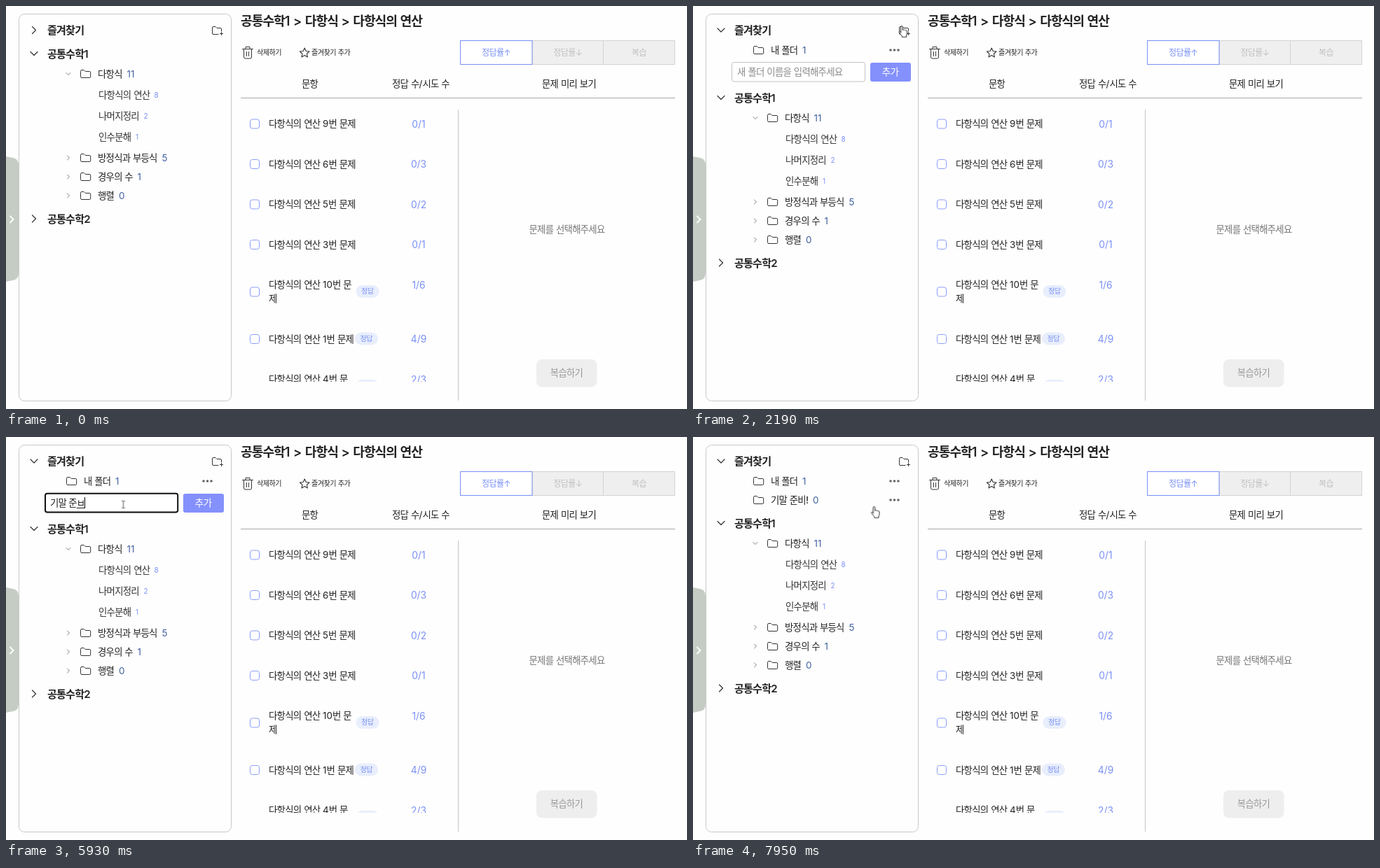
Write an HTML page that moves like this. It is 972 by 576 pixels and loops after 8 s.

```html
<!DOCTYPE html>
<html lang="ko">
<head>
<meta charset="utf-8">
<title>문제 폴더</title>
<style>
html, body { margin: 0; width: 100%; height: 100%; overflow: hidden; background: #fefefe; }
body { position: relative; font-family: Inter, "Noto Sans CJK KR", "Noto Sans CJK", sans-serif; }
svg { position: absolute; left: 0; top: 0; width: 972px; height: 576px; }
text { white-space: pre; }
.k { letter-spacing: -.055em; }
.line { fill: none; stroke: #333; stroke-linecap: round; stroke-linejoin: round; }
.anim, .anim::before { animation: 8s step-end infinite; }

/* sidebar */
#tree { animation-name: tree; }
@keyframes tree {
  0% { transform: translateY(0); }
  24.75% { transform: translateY(63px); }
  95.25%, 100% { transform: translateY(55px); }
}
#closed { animation-name: closed; }
@keyframes closed { 0% { opacity: 1; } 24.75%, 100% { opacity: 0; } }
#opened { animation-name: opened; }
@keyframes opened { 0% { opacity: 0; } 24.75%, 100% { opacity: 1; } }
#form, #field { animation-name: form; }
@keyframes form { 0% { opacity: 0; } 24.75% { opacity: 1; } 95.25%, 100% { opacity: 0; } }
#added { animation-name: added; }
@keyframes added { 0% { opacity: 0; } 95.25%, 100% { opacity: 1; } }
#focus { animation-name: focus; }
@keyframes focus { 0% { opacity: 0; } 44.125% { opacity: 1; } 93.5%, 100% { opacity: 0; } }
#hint { animation-name: hint; }
@keyframes hint {
  0% { opacity: 1; }
  53.25% { opacity: 0; }
  58.25% { opacity: 1; }
  60.75%, 100% { opacity: 0; }
}

/* typing */
#field {
  position: absolute; left: 63px; top: 80px; height: 28px;
  font-size: 13.4px; line-height: 28px; letter-spacing: -.055em;
  white-space: pre; color: #222;
}
#field i { font-style: normal; }
#done::before { content: ""; animation-name: done; }
@keyframes done {
  0% { content: ""; }
  64.125% { content: "기"; }
  67.5% { content: "기말 "; }
  74.125% { content: "기말 준"; }
  78.25%, 100% { content: "기말 준비!"; }
}
#comp { text-decoration: underline 1px; text-underline-offset: 2px; }
#comp::before { content: ""; animation-name: comp; }
@keyframes comp {
  0% { content: ""; }
  53.25% { content: "ㄱ"; }
  58.25% { content: ""; }
  60.75% { content: "ㄱ"; }
  61.625% { content: "기"; }
  63.25% { content: "김"; }
  64.125% { content: "마"; }
  65.75% { content: "말"; }
  67.5% { content: ""; }
  69.25% { content: "ㅈ"; }
  70% { content: "주"; }
  70.875% { content: "준"; }
  74.125% { content: "ㅂ"; }
  74.875% { content: "비"; }
  78.25%, 100% { content: ""; }
}
#caret {
  display: inline-block; width: 1px; height: 16px; margin-right: -1px;
  vertical-align: -3px; background: #000; animation-name: caret;
}
@keyframes caret {
  0% { opacity: 0; }
  44.125% { opacity: 1; }
  50.75% { opacity: 0; }
  53.25% { opacity: 1; }
  84.875% { opacity: 0; }
  91.5% { opacity: 1; }
  93.5%, 100% { opacity: 0; }
}

/* pointer */
#pointer { animation: move 8s linear infinite; }
@keyframes move {
  0%, 4.125% { transform: translate(766px, 520px); animation-timing-function: ease-in-out; }
  13.8%, 14.25% { transform: translate(295.5px, 65.5px); animation-timing-function: ease-out; }
  16.5%, 26.5% { transform: translate(296px, 28.5px); }
  27.375%, 28% { transform: translate(298px, 28.5px); animation-timing-function: ease-in-out; }
  34%, 87.5% { transform: translate(167.5px, 96.5px); animation-timing-function: ease-in-out; }
  92.75%, 98% { transform: translate(263.5px, 93px); }
  99.25%, 100% { transform: translate(258.5px, 99.5px); }
}
#arrow { animation-name: arrow; }
@keyframes arrow {
  0% { opacity: 0; }
  4.125% { opacity: 1; }
  12.25% { opacity: 0; }
  91.25% { opacity: 1; }
  98.5%, 100% { opacity: 0; }
}
#hand { animation-name: hand; }
@keyframes hand {
  0% { opacity: 0; }
  12.25% { opacity: 1; }
  31.8% { opacity: 0; }
  98.5%, 100% { opacity: 1; }
}
#beam { animation-name: beam; }
@keyframes beam { 0% { opacity: 0; } 31.8% { opacity: 1; } 91.25%, 100% { opacity: 0; } }
#click { animation-name: click; }
@keyframes click {
  0% { opacity: 0; fill: #fbf312; }
  22.25% { opacity: .78; }
  24.75% { opacity: 0; }
  44.125% { opacity: .78; fill: #fbf312; }
  46.625% { opacity: 0; }
  93.5% { opacity: .92; fill: #b9b069; }
  96%, 100% { opacity: 0; fill: #b9b069; }
}
</style>
</head>
<body>
<svg id="ui" viewBox="0 0 972 576"></svg>
<div id="field" class="anim"><i id="done" class="anim"></i><i id="comp" class="anim"></i><b id="caret" class="anim"></b></div>
<svg viewBox="0 0 972 576">
  <g id="pointer">
    <circle id="click" class="anim" cx="-.8" r="10"/>
    <path id="arrow" class="anim" d="M0 0V11.5L2.6 9.2 4.4 13 6.1 12.2 4.4 8.6H8z" fill="#fff" stroke="#111" stroke-width=".9"/>
    <g id="hand" class="anim">
      <path transform="translate(-4.5 -.5)" fill="#fff" stroke="#222" stroke-linejoin="round"
        d="M3.2 10.4V1.9a1.3 1.3 0 0 1 2.6 0V6.6a1.2 1.2 0 0 1 2.2-.1 1.2 1.2 0 0 1 2.1.6 1.1 1.1 0 0 1 1.9.8V11q0 2-1 3.3v2.1H4.9V15Q3.6 13.4 1 10.2.2 8.9 1.2 8.3 2 8 3.2 9.6"/>
    </g>
    <path id="beam" class="anim" d="M-2.5-5H-1Q0-5 0-4Q0-5 1-5H2.5M0-4V4M-2.5 5H-1Q0 5 0 4Q0 5 1 5H2.5" fill="none" stroke="#444" stroke-width=".9"/>
  </g>
</svg>
<script>
const INK = '#222', BLUE = '#7a90f6', NAVY = '#41609f';

// y is the visual middle of the line
function label(x, y, s, { size = 13.4, fill = INK, weight = 400, mid = false } = {}) {
  const body = s.replace(/>/g, '&gt;').replace(/[가-힣]+/g, '<tspan class="k">$&</tspan>');
  return `<text x="${x}" y="${y + size * 0.37}" font-size="${size}" fill="${fill}" font-weight="${weight}"` +
    `${mid ? ' text-anchor="middle"' : ''}>${body}</text>`;
}
const rect = (x, y, w, h, r, fill, stroke = 'none', attrs = '') =>
  `<rect x="${x}" y="${y}" width="${w}" height="${h}" rx="${r}" fill="${fill}" stroke="${stroke}" ${attrs}/>`;
const path = (d, attrs = '') => `<path class="line" d="${d}" ${attrs}/>`;
const group = (id, body) => `<g id="${id}" class="anim">${body}</g>`;

const BOLD = 'stroke-width="1.2"', FAINT = 'stroke-width=".9" opacity=".7"';
const right = (x, y, r, pen = BOLD) => path(`M${x - r / 2} ${y - r}l${r} ${r}l${-r} ${r}`, pen);
const down = (x, y, r, pen = BOLD) => path(`M${x - r} ${y - r / 2}l${r} ${r}l${r} ${-r}`, pen);
const folder = (x, y) => path(`M${x + .5} ${y - 4}q0-1.5 1.5-1.5h3.2l2 2h6q1.5 0 1.5 1.5v6q0 1.5-1.5 1.5h-11.2q-1.5 0-1.5-1.5z`);
const head = (y, s) => label(59, y, s, { size: 15.1, weight: 600 });
const dots = y => [282, 287.5, 293].map(x => `<circle cx="${x}" cy="${y}" r="1.8" fill="#666"/>`).join('');

function branch(y, name, nameEnd, count, open) {
  return (open ? down : right)(89, y, 3, FAINT) + folder(106, y) +
    label(131, y, name, { weight: 500 }) + label(nameEnd, y, count, { fill: NAVY });
}
const leaf = (y, name, end, count) =>
  label(132, y, name, { fill: '#333' }) + label(end, y, count, { size: 10, fill: BLUE });
const saved = (y, name, end, count) =>
  folder(86, y) + label(111, y, name, { weight: 500 }) + label(end, y, count, { fill: NAVY }) + dots(y);

function sidebar() {
  const tree = down(40, 68, 5) + head(68, '공통수학1') +
    branch(97, '다항식', 172.5, '11', true) +
    leaf(127, '다항식의 연산', 211.5, '8') +
    leaf(157, '나머지정리', 196.5, '2') +
    leaf(187, '인수분해', 185, '1') +
    branch(217, '방정식과 부등식', 222.5, '5') +
    branch(244, '경우의 수', 187.5, '1') +
    branch(271, '행렬', 161, '0') +
    right(40, 304, 5) + head(304, '공통수학2');
  const form = rect(55.5, 80.5, 190, 27.5, 3, '#fff', '#c2c2c2') +
    group('focus', rect(56, 80.8, 189.2, 26.7, 3, '#fff', '#111', 'stroke-width="2"')) +
    group('hint', label(63, 94, '새 폴더 이름을 입력해주세요', { fill: '#8a8a8a' })) +
    rect(253, 81, 58, 27, 3, '#8490fc') +
    label(281.5, 94, '추가', { size: 13.8, fill: '#fff', weight: 500, mid: true });
  return '<path d="M0 215L10 217Q18 218.5 18 227V382Q18 390.5 10 392L0 394z" fill="#c5ccc4"/>' +
    '<path d="M5.5 300l5 5-5 5" fill="none" stroke="#fff" stroke-width="1.8"/>' +
    rect(18.5, 11.5, 303, 553, 8, '#fefefe', '#c8c8c8') +
    head(34.5, '즐겨찾기') +
    path('M303 40.5H296q-1.5 0-1.5-1.5V31q0-1.5 1.5-1.5h3l2 2h5q1.5 0 1.5 1.5V36M307.5 37.5v4M305.5 39.5h4') +
    group('closed', right(40, 34.5, 5)) +
    group('opened', down(40, 34.5, 5) + saved(63, '내 폴더', 156, '1')) +
    group('form', form) +
    group('added', saved(90, '기말 준비!', 171, '0')) +
    group('tree', tree);
}

function star(cx, cy, R, r) {
  const pts = Array.from({ length: 10 }, (_, i) => {
    const a = Math.PI * (i / 5 - 0.5), d = i % 2 ? r : R;
    return `${(cx + d * Math.cos(a)).toFixed(2)} ${(cy + d * Math.sin(a)).toFixed(2)}`;
  });
  return path(`M${pts.join('L')}z`, 'stroke-width="1.1"');
}

function toolbar() {
  const tab = (x, w, s, on) =>
    rect(x, 49.5, w, 34, 0, on ? '#fff' : '#efefef', on ? BLUE : '#d2d2d2') +
    label(x + w / 2, 66.5, s, { size: 12.1, fill: on ? BLUE : '#c0c0c0', mid: true });
  return label(335, 21, '공통수학1 > 다항식 > 다항식의 연산', { size: 18.15, weight: 600 }) +
    path('M337.5 61.5h15M342 61v-2.5h6V61M339.5 62v11q0 2 2 2h7q2 0 2-2V62M343.5 65.5v6M346.5 65.5v6') +
    label(358, 66.5, '삭제하기', { size: 10.1 }) +
    star(426.2, 67.2, 7.2, 3.4) +
    label(436, 66.5, '즐겨찾기 추가', { size: 10.1 }) +
    tab(751.5, 101, '정답률↓') + tab(852.5, 102, '복습') + tab(648.5, 102.5, '정답률↑', true);
}

function badge(x, y) {
  return rect(x, y, 33, 18, 9, '#e8eefc') +
    label(x + 16.3, y + 8.7, '정답', { size: 10.1, fill: BLUE, mid: true });
}

function problem(y, n, score, { boxY = y, tail = ' 문제', extra = '' } = {}) {
  return rect(348.5, boxY - 6.5, 13, 13, 3, '#fff', '#8b9df8') +
    label(375, y, `다항식의 연산 ${n}번${tail}`) +
    label(589, y, score, { size: 13.8, fill: BLUE, mid: true }) + extra;
}

function list() {
  const mid = (x, y, s, fill = INK) => label(x, y, s, { fill, mid: true });
  const rows = problem(168.5, 9, '0/1') + problem(226, 6, '0/3') +
    problem(283.5, 5, '0/2') + problem(341, 3, '0/1') +
    problem(398.5, 10, '1/6', { boxY: 408.5, tail: ' 문', extra: label(375, 418.5, '제') + badge(499.5, 399) }) +
    problem(476, 1, '4/9', { extra: badge(498, 466.5) }) +
    problem(533.5, 4, '2/3', { boxY: 545, tail: ' 문', extra: badge(499.5, 534) });
  return mid(433.5, 111, '문항') + mid(592, 111, '정답 수/시도 수') + mid(803.5, 111, '문제 미리 보기') +
    rect(335, 131, 620, 1, 0, '#a8a8a8') + rect(645, 148, 1, 416, 0, '#c4c4c4') +
    `<clipPath id="view">${rect(335, 140, 310, 397, 0, '#000')}</clipPath><g clip-path="url(#view)">${rows}</g>` +
    mid(800.5, 319.5, '문제를 선택해주세요', '#777') +
    rect(757, 505, 86.5, 39.5, 8, '#eee') + mid(800, 524.5, '복습하기', '#999');
}

document.getElementById('ui').innerHTML = sidebar() + toolbar() + list();
</script>
</body>
</html>
```
